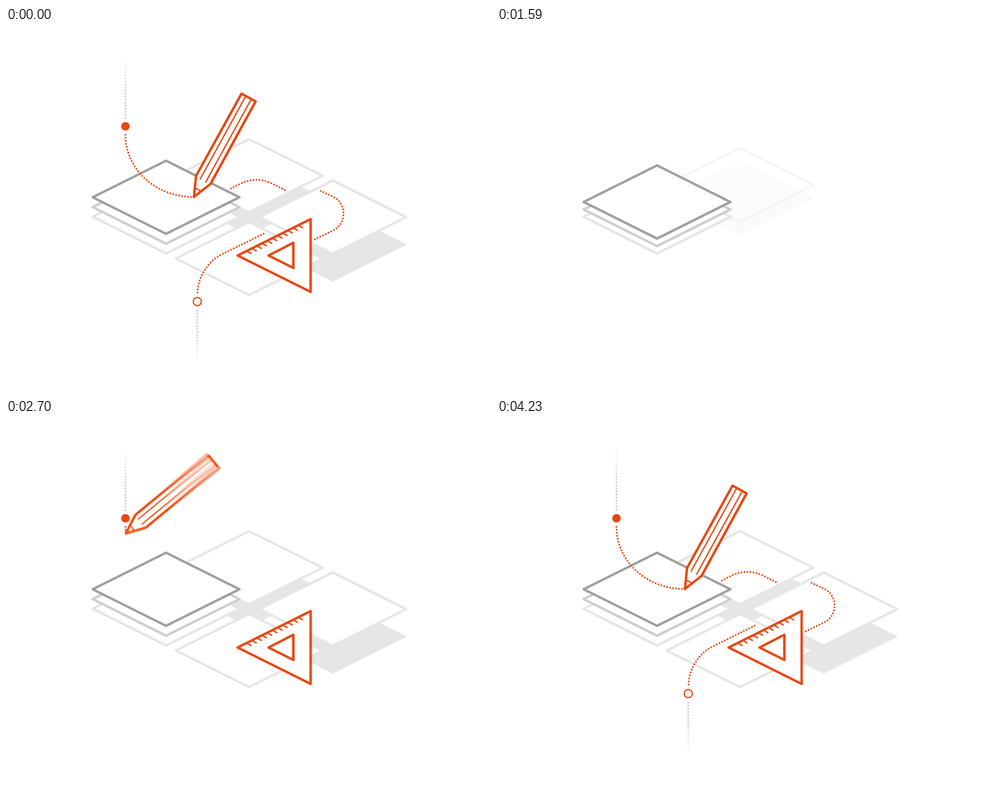
An HTML page with a canvas for the animation above (5.04 s loop, 800 px wide and 600 px high).

```html
<!DOCTYPE html>
<html lang="en">
<head>
<meta charset="utf-8">
<title>Layers and tools</title>
<style>
  html, body { margin: 0; width: 100%; height: 100%; overflow: hidden; background: #fff; }
  canvas { display: block; }
</style>
</head>
<body>
<canvas id="stage" width="800" height="600"></canvas>
<script>
const ctx = document.getElementById('stage').getContext('2d');
const LOOP = 5040, STEP = 30, INTRO = 90;
const ORANGE = '#e84610', DARK = '#9f9f9f', MID = '#cecece', LIGHT = '#e6e6e6';
const HW = 121, HH = 60.3;

// Easing
const clamp = x => Math.min(1, Math.max(0, x));
const span = (t, start, length) => clamp((t - start) / length);
const outQuad = x => 1 - (1 - x) * (1 - x);
const inOutQuad = x => x < 0.5 ? 2 * x * x : 1 - 2 * (1 - x) * (1 - x);
const outBack = (x, s) => 1 + (s + 1) * (x - 1) ** 3 + s * (x - 1) ** 2;
const mix = (a, b, k) => a + (b - a) * k;

// Dotted routes
function route(d) {
  const el = document.createElementNS('http://www.w3.org/2000/svg', 'path');
  el.setAttribute('d', d);
  return { shape: new Path2D(d), length: el.getTotalLength(), at: s => el.getPointAtLength(s) };
}
const penRoute = route('M197 176C197 233 247 279 310 278.5');
const backRoute = route('M371 264.5L386 257Q413 243.5 440 257L461 267.5');
const rightRoute = route('M519 268.5L541 279C562 290 562 322 541 333L507 349.5');
const frontRoute = route('M425 339L356 373C332 385 316 412 316 437');
const topLine = route('M197 3V149');
const bottomLine = route('M315.5 466V556');

function fadeStyle(clearY, solidY) {
  const g = ctx.createLinearGradient(0, clearY, 0, solidY);
  g.addColorStop(0, 'rgba(198,198,198,0)');
  g.addColorStop(1, 'rgba(198,198,198,1)');
  return g;
}
const topFade = fadeStyle(42, 108);
const bottomFade = fadeStyle(557, 492);

function dots(line, k, style = ORANGE) {
  if (k <= 0) return;
  const count = Math.floor(line.length * k / 5) + 1;
  const dash = [];
  for (let i = 0; i < count; i++) dash.push(0.01, i < count - 1 ? 4.99 : 9999);
  ctx.save();
  ctx.setLineDash(dash);
  ctx.lineCap = 'round';
  ctx.lineWidth = 3;
  ctx.strokeStyle = style;
  ctx.stroke(line.shape);
  ctx.restore();
}

function poly(c, pts, closed = true) {
  c.beginPath();
  pts.forEach(([x, y]) => c.lineTo(x, y));
  if (closed) c.closePath();
}

const rhomb = (x, y, w = HW, h = HH) => [[x - w, y], [x, y + h], [x + w, y], [x, y - h]];

function tile(x, y, color, alpha = 1) {
  if (alpha <= 0) return;
  ctx.globalAlpha = alpha;
  poly(ctx, rhomb(x, y));
  ctx.fillStyle = '#fff';
  ctx.fill();
  ctx.lineWidth = 4;
  ctx.strokeStyle = color;
  ctx.stroke();
  ctx.globalAlpha = 1;
}

function shadow(x, y, alpha) {
  ctx.globalAlpha = alpha;
  poly(ctx, rhomb(x, y, 122.5, 61.3));
  ctx.fillStyle = LIGHT;
  ctx.fill();
  ctx.globalAlpha = 1;
}

function outline(t) {
  const total = 4 * Math.hypot(HW, HH);
  const k = inOutQuad(span(t, 70, 1300));
  ctx.save();
  ctx.setLineDash([total * k, total * 2]);
  ctx.lineCap = 'round';
  ctx.lineWidth = 4;
  ctx.strokeStyle = DARK;
  poly(ctx, rhomb(264, 311));
  ctx.stroke();
  ctx.restore();
}

function tiles(t) {
  const rise = (start, length) => 1 - outQuad(span(t, start, length));
  const lift = outBack(span(t, 1400, 900), 1.9);

  shadow(401, 280, span(t, 1520, 350));
  tile(401, 243.5 + 19.5 * rise(1500, 730), LIGHT, span(t, 1500, 220));
  shadow(539, 357, span(t, 1700, 370));
  tile(401, 380 + 24 * rise(1700, 800), LIGHT, span(t, 1700, 220));
  tile(539, 311.7 + 14.2 * rise(1690, 710), LIGHT, span(t, 1690, 220));

  if (t < 1400) return outline(t);
  tile(264, 311.3, LIGHT);
  tile(264, mix(311.3, 295.3, lift), MID);
  tile(264, mix(311.3, 279, lift), DARK);
}

function setSquare(t) {
  const alpha = span(t, 1820, 290);
  if (!alpha) return;
  const away = 1 - outQuad(span(t, 1825, 675));
  ctx.save();
  ctx.globalAlpha = alpha;
  ctx.translate(47 * away, 23 * away);
  ctx.strokeStyle = ORANGE;
  ctx.fillStyle = '#fff';
  ctx.lineWidth = 4;
  poly(ctx, [[382, 375], [502.5, 315], [502.5, 435]]);
  ctx.fill();
  ctx.stroke();
  poly(ctx, [[433, 375], [474, 354], [474, 395.5]]);
  ctx.stroke();
  ctx.lineWidth = 2.4;
  ctx.beginPath();
  for (let i = 0; i < 11; i++) {
    const x = 397 + i * 8.5, y = 367.8 - i * 4.25;
    ctx.moveTo(x, y);
    ctx.lineTo(x + 8, y + 4.4);
  }
  ctx.stroke();
  ctx.restore();
}

// Pencil, tip at the origin and body along +x
function pencilShape(c) {
  c.lineJoin = 'round';
  c.strokeStyle = ORANGE;
  c.fillStyle = '#fff';
  c.lineWidth = 4;
  poly(c, [[0, 0], [32, -13.6], [187, -13.3], [187, 13.3], [32, 13.6]]);
  c.fill();
  c.stroke();
  c.lineWidth = 2.2;
  c.beginPath();
  for (const y of [-5.2, 5.2]) {
    c.moveTo(30, y);
    c.lineTo(186, y);
  }
  c.moveTo(14, -5.6);
  c.lineTo(14, 5.6);
  c.stroke();
}

const sprite = document.createElement('canvas');
sprite.width = 400;
sprite.height = 80;
const sc = sprite.getContext('2d');
sc.setTransform(2, 0, 0, 2, 12, 40);
pencilShape(sc);

const layer = document.createElement('canvas');
layer.width = 800;
layer.height = 600;
const lc = layer.getContext('2d');

function pose(t) {
  const fly = outQuad(span(t, 2230, 330));
  const p = penRoute.at(penRoute.length * inOutQuad(span(t, 2560, 780)));
  const turn = outBack(span(t, 2694, 650), 1.7);
  return {
    x: p.x + 193 * (1 - fly),
    y: p.y - 104 * (1 - fly),
    angle: -mix(38.3 + 2.5 * (1 - fly), 61.2, turn) * Math.PI / 180
  };
}

function place(c, p) {
  c.translate(p.x, p.y);
  c.rotate(p.angle);
}

function pencil(t) {
  const alpha = span(t, 2230, 200);
  if (!alpha) return;
  ctx.save();
  ctx.globalAlpha = alpha;
  if (t > 3360) {
    place(ctx, pose(t));
    pencilShape(ctx);
  } else {
    // average several poses for motion blur
    const n = 10;
    lc.clearRect(0, 0, 800, 600);
    lc.globalCompositeOperation = 'lighter';
    lc.globalAlpha = 1 / n;
    for (let i = 0; i < n; i++) {
      lc.save();
      place(lc, pose(t + (i / (n - 1) - 0.5) * 26));
      lc.drawImage(sprite, -6, -20, 200, 40);
      lc.restore();
    }
    ctx.drawImage(layer, 0, 0);
  }
  ctx.restore();
}

function knob(x, y, t, start, radius, extra, hollow) {
  const alpha = span(t, start, 200);
  if (!alpha) return;
  ctx.globalAlpha = alpha;
  ctx.beginPath();
  ctx.arc(x, y, radius + extra * (1 - outQuad(span(t, start, 370))), 0, Math.PI * 2);
  ctx.fillStyle = hollow ? '#fff' : ORANGE;
  ctx.fill();
  if (hollow) {
    ctx.lineWidth = 2;
    ctx.strokeStyle = ORANGE;
    ctx.stroke();
  }
  ctx.globalAlpha = 1;
}

function draw(t) {
  ctx.fillStyle = '#fff';
  ctx.fillRect(0, 0, 800, 600);
  ctx.lineJoin = 'round';
  tiles(t);
  dots(topLine, inOutQuad(span(t, 1740, 430)), topFade);
  dots(penRoute, inOutQuad(span(t, 2560, 780)));
  dots(backRoute, inOutQuad(span(t, 2800, 300)));
  dots(rightRoute, inOutQuad(span(t, 2950, 340)));
  dots(frontRoute, outQuad(span(t, 3088, 617)));
  dots(bottomLine, inOutQuad(span(t, 3860, 345)), bottomFade);
  setSquare(t);
  knob(197, 162, t, 2230, 7, 10.5, false);
  knob(315.5, 451, t, 3780, 6.7, 6, true);
  pencil(t);
}

const begin = performance.now();
function frame() {
  const now = Math.max(0, performance.now() - begin) % LOOP;
  const t = Math.floor(now / STEP) * STEP;
  draw(t < INTRO ? LOOP : t);
  requestAnimationFrame(frame);
}
frame();
</script>
</body>
</html>
```
